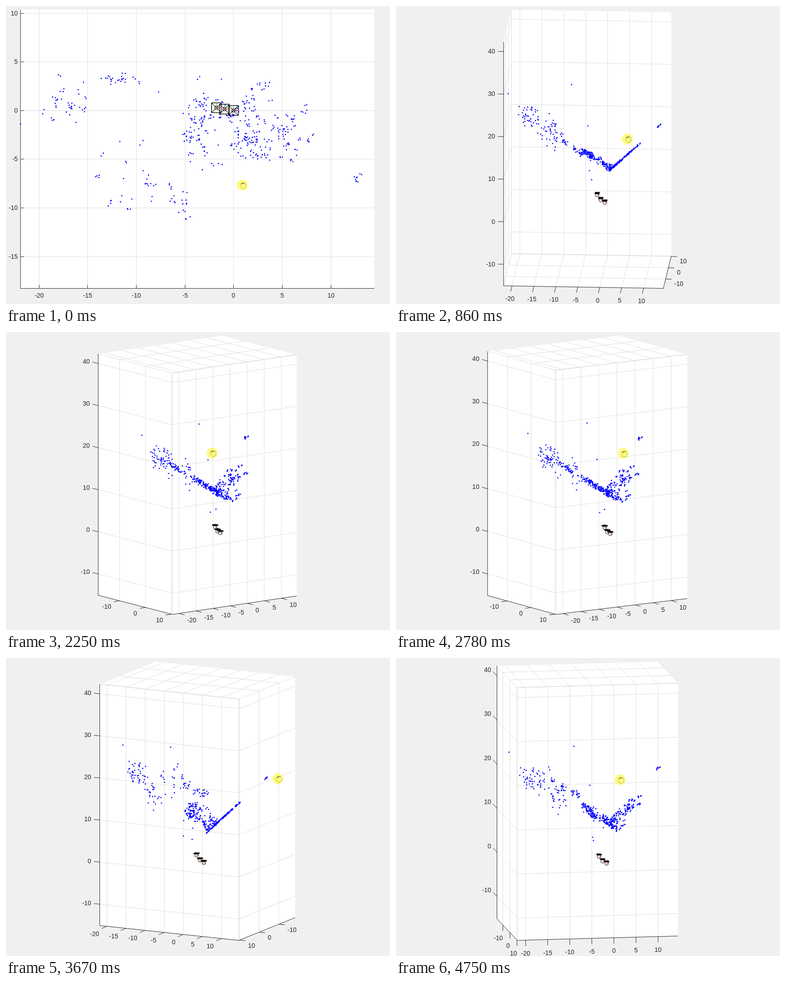
Recreate the animation shown at these times as an HTML page with a canvas. Size 850 px wide and 659 px high, loop 4.78 s.

```html
<!DOCTYPE html>
<html>
<head>
<meta charset="utf-8">
<title>Rotating point cloud</title>
<style>
html, body { margin: 0; height: 100%; overflow: hidden; background: #f0f0f0; }
canvas { display: block; }
</style>
</head>
<body>
<canvas id="stage" width="850" height="659"></canvas>
<script>
const ctx = document.getElementById('stage').getContext('2d');
const LOOP = 4780, INK = '#262626', GRID = '#dfdfdf';
const MIN = [-21.9, -18.28, -15.07], MAX = [14.49, 10.36, 42.25];
const MID = MIN.map((v, i) => (v + MAX[i]) / 2);
const SPAN = MIN.map((v, i) => MAX[i] - v);
const FRAME = { x: 423.75, y: 316.25, w: 783.5, h: 616.5 };

// Key points: [time, value]
const AZIMUTH = [[50, 0], [860, 3.6], [1640, 6.3], [2440, 42], [2780, 33.5],
  [3670, -27.2], [3900, -36], [4210, -23.4], [4750, 9.1]];
const ELEVATION = [[50, 90], [570, 60], [860, 14.9], [960, 14.9], [1640, -12.2],
  [2780, -10.5], [4000, -12.3], [4210, -12.2], [4750, -9.85]];
const POINTER = [[50, 523], [860, 512], [1640, 497], [2330, 455], [2780, 503],
  [3700, 602], [4210, 552], [4750, 496]];

// Regions of the cloud: centre x, centre y, half width, half height, points
const REGIONS = [
  [-17, 1, 2.6, 3, 42], [-11.5, 3.1, 3, .6, 26], [-11.5, -7.5, 4.2, 4.4, 34],
  [-5, -9, 2, 2.8, 22], [-3, -1.5, 2.8, 5.4, 115], [1.4, -1.8, 2.4, 5, 125],
  [5.2, -2.4, 3.6, 5.4, 95], [13.1, -7.8, 1.3, 4.4, 9]
];
const STRAYS = [[-7.7, 1.9, 27.1], [-3.85, .3, 17.9], [-3, .1, 5.3], [-3.7, 3.2, 6.6], [-21.9, -1.4, 25.6]];
const CAMERAS = [[0, 0, 0], [-.92, .14, .54], [-1.75, .28, 1.66]];

function ticks(dim, step) {
  const list = [];
  for (let v = Math.ceil(MIN[dim] / step) * step; v <= MAX[dim]; v += step) list.push(v);
  return list;
}
const TICKS = [ticks(0, 5), ticks(1, 10), ticks(2, 10)];

let seed = 11;
const random = () => (seed = seed * 16807 % 2147483647) / 2147483647;
const spread = r => r * (random() + random() - 1);

// Two walls meeting in a corner; the left one gets rougher far out.
function depth(x, y) {
  const left = 9.16 - .62 * x - .19 * y, right = 6.57 + .92 * x - .25 * y;
  return right > left ? right + spread(.2) : left + spread(x < -11 ? 4 : .9);
}

// Points come in small clumps
function makeCloud() {
  const cloud = [...STRAYS];
  for (const [cx, cy, rx, ry, count] of REGIONS) {
    let left = count;
    while (left > 0) {
      const x0 = cx + spread(rx), y0 = cy + spread(ry);
      for (let n = Math.min(left, 1 + Math.floor(4 * random())); n > 0; n--, left--) {
        const x = x0 + spread(.4), y = Math.min(4, y0 + spread(.5));
        cloud.push([x, y, depth(x, y)]);
      }
    }
  }
  return cloud;
}
const points = makeCloud();

// Monotone cubic through key points, constant outside them
function follow(keys, t) {
  const last = keys.length - 1;
  if (t <= keys[0][0]) return keys[0][1];
  if (t >= keys[last][0]) return keys[last][1];
  const slope = k => (keys[k + 1][1] - keys[k][1]) / (keys[k + 1][0] - keys[k][0]);
  const tangent = k => {
    if (k === 0) return slope(0);
    if (k === last) return slope(last - 1);
    const a = slope(k - 1), b = slope(k);
    return a * b <= 0 ? 0 : 2 * a * b / (a + b);
  };
  let i = 0;
  while (keys[i + 1][0] <= t) i++;
  const [[t0, a], [t1, b]] = [keys[i], keys[i + 1]];
  const h = t1 - t0, u = (t - t0) / h;
  return a + (b - a) * u * u * (3 - 2 * u)
    + h * u * (1 - u) * (tangent(i) * (1 - u) - tangent(i + 1) * u);
}

// Orthographic view, scaled so that the box fits the frame
function makeProjection(az, el) {
  const rad = Math.PI / 180;
  const ca = Math.cos(az * rad), sa = Math.sin(az * rad);
  const ce = Math.cos(el * rad), se = Math.sin(el * rad);
  const w = SPAN[0] * ca + SPAN[1] * Math.abs(sa);
  const h = SPAN[2] * ce + Math.abs(se) * (SPAN[1] * ca + SPAN[0] * Math.abs(sa));
  const scale = Math.min(FRAME.w / w, FRAME.h / h);
  return p => {
    const [x, y, z] = p.map((v, i) => v - MID[i]);
    return [FRAME.x + scale * (x * ca + y * sa),
            FRAME.y - scale * (z * ce + se * (y * ca - x * sa))];
  };
}

function path(pts) {
  ctx.beginPath();
  pts.forEach(p => ctx.lineTo(...p));
}
function stroke(color, ...pts) {
  ctx.strokeStyle = color;
  path(pts);
  ctx.stroke();
}
function circle(x, y, r, from = 0, to = 2 * Math.PI) {
  ctx.beginPath();
  ctx.arc(x, y, r, from, to);
}
function label(text, x, y, align) {
  ctx.fillStyle = INK;
  ctx.textAlign = align;
  ctx.fillText(text, x, y + 1);
}
const along = (base, dim, v) => base.map((b, i) => i === dim ? v : b);

// One side of the box, where coordinate dim is fixed at value
function plane(project, dim, value, part) {
  const [a, b] = [0, 1, 2].filter(d => d !== dim);
  const at = (u, v) => {
    const p = [0, 0, 0];
    p[dim] = value; p[a] = u; p[b] = v;
    return project(p);
  };
  if (part === 'fill') {
    ctx.fillStyle = '#fff';
    path([at(MIN[a], MIN[b]), at(MAX[a], MIN[b]), at(MAX[a], MAX[b]), at(MIN[a], MAX[b])]);
    ctx.fill();
  } else {
    TICKS[a].forEach(v => stroke(GRID, at(v, MIN[b]), at(v, MAX[b])));
    TICKS[b].forEach(v => stroke(GRID, at(MIN[a], v), at(MAX[a], v)));
  }
}

function axis(project, dim, base, dir, align) {
  const from = project(along(base, dim, MIN[dim])), to = project(along(base, dim, MAX[dim]));
  stroke(INK, from, to);
  if (Math.hypot(to[0] - from[0], to[1] - from[1]) < 30) return;
  const p0 = project(base), p1 = project(base.map((b, i) => b + dir[i]));
  const len = Math.hypot(p1[0] - p0[0], p1[1] - p0[1]) || 1;
  const dx = (p1[0] - p0[0]) / len, dy = (p1[1] - p0[1]) / len;
  align = align || (dx > .6 ? 'left' : dx < -.6 ? 'right' : 'center');
  for (const v of TICKS[dim]) {
    const [x, y] = project(along(base, dim, v));
    stroke(INK, [x, y], [x + 13 * dx, y + 13 * dy]);
    label(v, x + 19 * dx, y + 19 * dy + (dim < 2 ? 10 : 0), align);
  }
}

function drawBox(project, az, el) {
  const above = el > 0, turned = az >= 0;
  const far = [turned ? MIN[0] : MAX[0], MAX[1], above ? MIN[2] : MAX[2]];
  for (const part of ['fill', 'grid'])
    far.forEach((v, dim) => plane(project, dim, v, part));
  far.forEach((v, dim) =>
    stroke(GRID, project(along(far, dim, MIN[dim])), project(along(far, dim, MAX[dim]))));

  const down = Math.abs(el) < 10 ? [0, 0, -1] : null;
  const right = turned === above;
  axis(project, 0, [MIN[0], above ? MIN[1] : MAX[1], MIN[2]], down || [0, above ? -1 : 1, 0]);
  axis(project, 1, [right ? MAX[0] : MIN[0], MIN[1], MIN[2]],
    down || [right ? 1 : -1, 0, 0], right ? 'left' : 'right');
  axis(project, 2, [MIN[0], turned ? MIN[1] : MAX[1], MIN[2]],
    !above && turned ? [0, -1, 0] : [-1, 0, 0], 'right');
}

function drawFlat(project) {
  const [l, b] = project(MIN), [r, t] = project(MAX);
  const snap = v => Math.round(v - .2) + .5;
  const xs = TICKS[0].map(v => [v, snap(project([v, 0, 0])[0])]);
  const ys = ticks(1, 5).map(v => [v, snap(project([0, v, 0])[1])]);
  ctx.fillStyle = '#fff';
  ctx.fillRect(l, t, r - l, b - t);
  for (const [, x] of xs) stroke(GRID, [x, t], [x, b]);
  for (const [, y] of ys) stroke(GRID, [l, y], [r, y]);
  for (const [v, x] of xs) {
    stroke(INK, [x, b], [x, b - 8]);
    label(v, x, b + 16, 'center');
  }
  for (const [v, y] of ys) {
    stroke(INK, [l, y], [l + 8, y]);
    label(v, l - 6, y, 'right');
  }
  stroke(INK, [l, t], [l, b], [r, b]);
}

function drawCamera(project, c) {
  const at = (x, y, z) => project([c[0] + x, c[1] + y, c[2] + z]);
  const [x, y] = at(0, 0, 0);
  for (const z of [.4, .55]) {
    const q = [at(-.5, -.5, z), at(.5, -.5, z), at(.5, .5, z), at(-.5, .5, z)];
    stroke('#000', ...q, q[0], q[2]);
    stroke('#000', q[1], q[3]);
  }
  circle(x, y, 4);
  ctx.stroke();
  stroke('#0d0', [x, y], at(0, .5, 0));
  stroke('#f00', [x, y], at(.5, 0, 0));
}

function drawPointer(x, y) {
  ctx.fillStyle = 'rgba(255,250,0,.5)';
  circle(x, y, 12);
  ctx.fill();
  ctx.strokeStyle = '#333';
  ctx.setLineDash([1.3, 2]);
  circle(x + 2.5, y + 1.5, 6);
  ctx.stroke();
  ctx.setLineDash([]);
  circle(x + 2.5, y + 1.5, 6, -2.4, -1);
  ctx.stroke();
  stroke('#333', [x - 3, y - 3], [x + 1, y - 3]);
}

function draw(t) {
  const az = follow(AZIMUTH, t), el = follow(ELEVATION, t);
  const project = makeProjection(az, el);
  ctx.fillStyle = '#f0f0f0';
  ctx.fillRect(0, 0, 850, 659);
  ctx.font = '14px "Liberation Sans", Arial, sans-serif';
  ctx.textBaseline = 'middle';
  ctx.lineWidth = 1;
  if (el === 90) drawFlat(project);
  else drawBox(project, az, el);
  ctx.fillStyle = '#00f';
  for (const p of points) {
    circle(...project(p), 1.4);
    ctx.fill();
  }
  CAMERAS.forEach(c => drawCamera(project, c));
  // The pointer's height follows the tilt
  drawPointer(follow(POINTER, t), 279 + el + .36 * Math.max(0, el - 15));
}

const start = performance.now();
function tick() {
  draw((performance.now() - start) % LOOP);
  requestAnimationFrame(tick);
}
tick();
</script>
</body>
</html>
```
